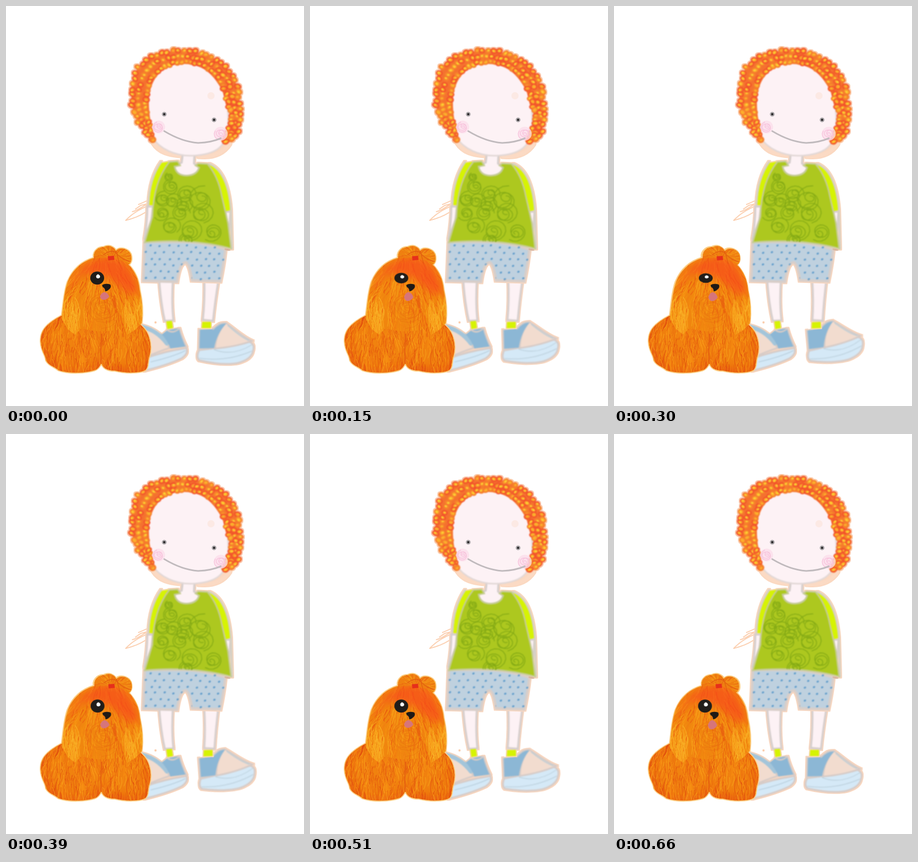
An HTML page that plays this animation: 580x780 px, repeating every 0.69 s.

```html
<!DOCTYPE html>
<html lang="en">
<head>
<meta charset="utf-8">
<title>Boy and dog</title>
<style>
  html, body { margin: 0; width: 100%; height: 100%; overflow: hidden; background: #fff; }
  svg { display: block; width: 580px; height: 780px; }
  .line { fill: none; stroke-linecap: round; stroke-linejoin: round; }
  .skin { fill: #fdf2f5; stroke: #d6cecc; stroke-width: 4; }
  .lime { fill: #d6f303; }
  .sole { fill: #d5e9f7; stroke: #d6cbc7; stroke-width: 3.5; }
  .denim { fill: #8cb7d5; }
  .toe { fill: #f2dccf; stroke: #d6cbc7; stroke-width: 3; }
  #leg, #shoe, #head, #eye, #tongue { animation: 690ms linear infinite; }
  #leg { transform-origin: 400px 540px; animation-name: leg; }
  #shoe { transform-origin: 390px 640px; animation-name: shoe; }
  #head { transform-origin: 186px 640px; animation-name: sway; }
  #eye { transform-origin: 178px 531px; animation-name: blink; }
  #tongue { transform-origin: 191px 558px; animation-name: pant; }
  @keyframes leg {
    0%, 13% { transform: rotate(0deg); }
    30.4% { transform: rotate(-2deg); }
    43.5% { transform: rotate(-2.4deg); }
    65.2% { transform: rotate(-2deg); }
    73.9% { transform: rotate(-1.3deg); }
    95.7%, 100% { transform: rotate(0deg); }
  }
  @keyframes shoe {
    0% { transform: rotate(0deg); }
    13% { transform: rotate(-.6deg); }
    30.4% { transform: rotate(-5.2deg); }
    43.5% { transform: rotate(-6.4deg); }
    65.2% { transform: rotate(-5.2deg); }
    73.9% { transform: rotate(-3.8deg); }
    95.7%, 100% { transform: rotate(0deg); }
  }
  @keyframes sway {
    0%, 13% { transform: rotate(0deg); }
    30.4% { transform: rotate(.3deg); }
    43.5% { transform: rotate(.6deg); }
    65.2% { transform: rotate(.2deg); }
    95.7% { transform: rotate(-.2deg); }
    100% { transform: rotate(0deg); }
  }
  @keyframes blink {
    0%, 17.4% { transform: scaleY(1); }
    30.4% { transform: scaleY(.47); }
    34.8% { transform: scaleY(.44); }
    43.5% { transform: scaleY(.73); }
    56%, 100% { transform: scaleY(1); }
  }
  @keyframes pant {
    0% { transform: scaleY(1); }
    13% { transform: scaleY(1.26); }
    30.4% { transform: scaleY(1.03); }
    43.5% { transform: scaleY(1.16); }
    65.2%, 73.9% { transform: scaleY(1); }
    95.7% { transform: scaleY(1.2); }
    100% { transform: scaleY(1); }
  }
</style>
</head>
<body>
<svg viewBox="0 0 580 780" width="580" height="780">
  <defs>
    <filter id="soft" filterUnits="userSpaceOnUse" x="0" y="0" width="580" height="780" color-interpolation-filters="sRGB">
      <feMorphology in="SourceAlpha" operator="dilate" radius="2"/>
      <feGaussianBlur stdDeviation=".6" result="edge"/>
      <feFlood flood-color="#fbd8c0"/>
      <feComposite in2="edge" operator="in" result="halo"/>
      <feGaussianBlur in="SourceGraphic" stdDeviation=".9" result="art"/>
      <feMerge><feMergeNode in="halo"/><feMergeNode in="art"/></feMerge>
    </filter>
    <filter id="blur"><feGaussianBlur stdDeviation=".7"/></filter>
    <filter id="mist" x="-40%" y="-40%" width="180%" height="180%"><feGaussianBlur stdDeviation="7"/></filter>
    <path id="bodyShape" d="M108 604 C82 618 65 632 68 658 C70 675 77 680 78 691 C84 702 93 702 102 710 C122 717 154 716 173 710 C181 707 182 701 186 697 C189 706 198 711 212 711 C232 716 261 716 271 710 C278 704 275 693 279 683 C285 662 279 636 264 624 L248 604 Z"/>
    <path id="headShape" d="M172 491 C147 498 130 514 120 538 C112 562 112 585 108 609 L120 630 L134 641 L148 628 C170 637 210 636 228 627 L236 641 L251 632 L264 618 C267 594 264 571 260 553 C258 531 250 517 240 506 Q225 489 172 491 Z"/>
    <path id="knotShape" d="M172 494 C167 481 177 470 190 470 C201 464 211 471 214 477 C222 469 238 473 243 484 C247 498 241 508 229 506 C220 506 213 497 207 493 C196 501 180 500 172 494 Z"/>
    <path id="shirtShape" d="M318 304 L334 303 L339 311 L328 313 Q331 331 352 331 Q372 330 376 315 L369 311 L374 307 L392 308 Q413 332 420 371 L432 424 L438 473 Q400 462 350 459 Q305 457 270 461 L285 411 Q287 342 318 304 Z"/>
    <path id="shortsShape" d="M270 460 L267 536 L333 538 Q338 500 350 500 Q357 503 362 535 L417 537 Q424 503 427 475 Q390 462 350 460 Z"/>
    <clipPath id="bodyClip"><use href="#bodyShape"/></clipPath>
    <clipPath id="headClip"><use href="#headShape"/></clipPath>
    <clipPath id="knotClip"><use href="#knotShape"/></clipPath>
    <clipPath id="shirtClip"><use href="#shirtShape"/></clipPath>
    <clipPath id="shortsClip"><use href="#shortsShape"/></clipPath>
  </defs>

  <!-- scribble behind the back -->
  <g class="line" stroke="#fbcfb0" stroke-width="2" stroke-dasharray="2 1">
    <path d="M273 391 Q248 402 233 418 Q254 413 272 402 M246 401 Q255 399 271 388 M252 396 L262 389 L273 386 M258 387 L274 380"/>
  </g>
  <circle cx="291" cy="617" r="2.2" fill="#fbcfb0"/>

  <g id="shoe" filter="url(#soft)">
    <path class="sole" d="M376 671 Q420 666 474 655 Q485 660 481 672 Q478 689 452 696 Q425 702 376 691 Q369 684 376 671 Z"/>
    <path class="toe" d="M428 618 C442 627 460 645 479 653 Q450 664 407 668 Q409 638 428 618 Z"/>
    <path class="line" d="M432 623 C442 632 456 645 472 652" stroke="#bccdd6" stroke-width="2"/>
    <path class="denim" d="M376 631 L400 630 L416 618 L430 618 Q411 636 405 667 L376 668 Z"/>
    <path class="line" d="M376 631 L375 671 M403 630 Q416 616 428 618" stroke="#d6cbc7" stroke-width="3"/>
    <path class="line" d="M377 687 Q430 694 478 673 M405 670 Q440 684 478 661" stroke="#bcd0dc" stroke-width="1.4"/>
  </g>
  <g id="leg" filter="url(#soft)">
    <path class="skin" d="M386 532 L414 532 Q407 575 403 614 L383 612 Q387 578 386 532 Z"/>
    <path class="lime" d="M382 616 L399 616 L399 628 L381 628 Z"/>
  </g>

  <g filter="url(#soft)">
    <path class="skin" d="M298 532 L325 532 Q322 580 326 613 L309 614 Q301 578 298 532 Z"/>
    <path class="lime" d="M312 615 L323 614 L325 628 L314 630 Z"/>
    <path class="sole" d="M351 667 Q356 677 342 687 Q315 700 270 711 L268 688 Q305 674 351 667 Z"/>
    <path class="toe" d="M262 622 C289 629 307 642 318 667 Q295 674 270 686 Z"/>
    <path class="line" d="M263 625 Q294 632 313 658" stroke="#a3c5da" stroke-width="8"/>
    <path class="denim" d="M304 640 L314 632 L337 628 Q343 645 351 664 L320 668 Q314 650 300 638 Z"/>
    <path class="line" d="M338 629 Q343 648 352 666 M314 632 Q325 640 337 629" stroke="#d6cbc7" stroke-width="3"/>
    <path class="line" d="M282 694 Q325 684 349 672" stroke="#b9cfdd" stroke-width="1.5"/>

    <use href="#shortsShape" fill="#bfd1df" stroke="#d8cec9" stroke-width="5"/>
    <g id="dots" fill="#5c9aca" clip-path="url(#shortsClip)"></g>

    <path class="skin" d="M275 391 L286 391 L283 417 L269 456 Q275 422 275 391 Z"/>
    <path class="skin" d="M427 401 L437 401 L434 440 Z"/>
    <path class="lime" d="M302 306 L320 303 Q294 344 288 389 L279 388 Q280 335 302 306 Z"/>
    <path class="lime" d="M390 308 Q430 318 437 398 L428 400 Q418 348 390 308 Z"/>
    <path class="line" d="M302 304 Q279 336 277 388 M396 308 Q432 323 438 398 L440 473" stroke="#d6d0c2" stroke-width="4"/>
    <path class="skin" d="M344 288 L342 305 L328 313 Q331 331 352 331 Q372 330 376 315 L366 307 L367 288 Z"/>
    <use href="#shirtShape" fill="#adc81f" stroke="#c5cc92" stroke-width="3"/>
    <g clip-path="url(#shirtClip)"><path id="swirls" class="line" stroke="#85ab15" stroke-width="1.7"/></g>

    <path class="line" d="M287 266 C300 286 320 289 337 291 M376 293 C406 296 425 284 435 268" stroke="#fbdac4" stroke-width="7"/>
    <path d="M284 255 C262 200 270 110 345 105 C420 105 440 190 430 250 C424 282 395 291 360 292 C330 292 300 280 284 255 Z" fill="#fdf2f5" stroke="#e2d8d6" stroke-width="3"/>
    <path fill="#f4712f" d="M284 260 C264 238 243 215 244 172 C244 118 272 88 340 87 C403 88 448 120 453 175 C460 220 455 260 428 264 C427 245 438 228 434 205 C424 190 427 175 418 160 C402 132 382 113 345 113 C325 113 305 120 290 142 C270 175 280 215 287 260 Z"/>
    <g id="curls" stroke-width="2.4"></g>
  </g>

  <g filter="url(#blur)">
    <circle cx="399" cy="175" r="7" fill="#fbdccb" opacity=".4"/>
    <g fill="#fbdcea" opacity=".75"><circle cx="297" cy="236" r="12.5"/><circle cx="418" cy="249" r="13.5"/></g>
    <path id="blush" class="line" stroke="#f8c6de" stroke-width="1.5"/>
    <path class="line" d="M308 244 Q343 265 374 267 Q400 266 418 258" stroke="#c0babd" stroke-width="3.2"/>
    <g fill="#2b292b" stroke="#a9a5a8" stroke-width="2.4"><circle cx="308" cy="211" r="3.4"/><circle cx="405" cy="222" r="3.4"/></g>
    <ellipse cx="431" cy="475" rx="6" ry="2" fill="#d8b6a0" transform="rotate(12 431 475)"/>
  </g>

  <g id="dog">
    <g fill="none" stroke="#fbcf86" stroke-width="4">
      <use href="#knotShape"/><use href="#headShape"/><use href="#bodyShape"/>
    </g>
    <use href="#bodyShape" fill="#f0820f"/>
    <g clip-path="url(#bodyClip)">
      <use href="#bodyShape" fill="none" stroke="#e2400f" stroke-width="18" opacity=".6" filter="url(#mist)"/>
      <g id="bodyFur"></g>
      <path class="line" d="M186 640 Q183 670 186 705" stroke="#e45e10" stroke-width="2"/>
    </g>
    <g id="head">
      <g clip-path="url(#knotClip)">
        <use href="#knotShape" fill="#ee8210"/>
        <g id="knotFur"></g>
      </g>
      <use href="#headShape" fill="#f0860f"/>
      <g clip-path="url(#headClip)">
        <g id="headFur"></g>
        <path d="M118 556 Q145 490 205 490 Q248 496 258 560 Q240 566 222 548 Q200 520 150 522 Z" fill="#f8461c" opacity=".65" filter="url(#mist)"/>
        <path id="muzzle" class="line" stroke="#e5680f" stroke-width="1" opacity=".5"/>
      </g>
      <path class="line" d="M190 485 Q202 475 213 480 Q222 492 239 498 M214 478 L221 502" stroke="#e2580f" stroke-width="1.6" opacity=".8"/>
      <path d="M198 488 L210 487 L211 495 L199 496 Z" fill="#e62f1b"/>
      <path id="tongue" d="M183 566 Q186 558 192 558 Q199 560 201 567 Q196 573 190 573 Q184 573 183 566 Z" fill="#d6757b"/>
      <path d="M187 544 Q194 540 203 543 Q206 549 200 553 Q197 557 193 556 Q193 550 188 548 Z" fill="#1e1a17"/>
      <g id="eye">
        <ellipse cx="177.5" cy="530.5" rx="13.5" ry="12.7" fill="#211d1a"/>
        <path d="M179 523 Q184 525 183 529 Q180 533 176 530 Q174 525 179 523 Z" fill="#fff"/>
      </g>
    </g>
  </g>
</svg>
<script>
  const $ = id => document.getElementById(id);
  const add = (parent, tag, attrs) => {
    const el = document.createElementNS('http://www.w3.org/2000/svg', tag);
    for (const k in attrs) el.setAttribute(k, attrs[k]);
    parent.appendChild(el);
    return el;
  };
  let seed = 7;
  const rnd = (a = 0, b = 1) => {
    seed = (seed * 16807) % 2147483647;
    return a + (b - a) * seed / 2147483647;
  };
  // loose hand-drawn rings that wind outwards
  const spiral = (x, y, r, turns = 3) => {
    let d = '';
    const n = turns * 14, phase = rnd(0, 6);
    for (let i = 0; i <= n; i++) {
      const a = phase + i / 14 * Math.PI * 2;
      const k = r * (.22 + .78 * i / n), drift = r * .14 * Math.sin(a * .37 + phase);
      d += `${i ? 'L' : 'M'}${(x + drift + k * Math.cos(a)).toFixed(1)} ${(y - drift + k * .9 * Math.sin(a)).toFixed(1)}`;
    }
    return d;
  };

  // hair: rows of curls between two guide curves
  const guide = d => add(document.querySelector('defs'), 'path', { d });
  const rimOut = guide('M284 260 C262 238 240 215 241 172 C241 116 270 85 340 84 C405 84 451 118 456 175 C463 220 457 260 428 264');
  const rimIn = guide('M286 258 C280 215 270 175 290 142 C305 120 325 113 345 113 C382 113 402 132 418 160 C427 175 424 190 434 205 C438 228 427 245 426 262');
  const at = (p, t) => p.getPointAtLength(p.getTotalLength() * t);
  for (let i = 0; i <= 46; i++) {
    for (const k of [.16, .54, .9]) {
      const t = Math.min(1, (i + (k === .54 ? .5 : 0)) / 46);
      const a = at(rimIn, t), b = at(rimOut, t);
      const x = a.x + (b.x - a.x) * k + rnd(-2, 2), y = a.y + (b.y - a.y) * k + rnd(-2, 2);
      const curl = add($('curls'), 'g', { transform: `translate(${x} ${y}) rotate(${rnd(-40, 40)})` });
      add(curl, 'ellipse', {
        rx: rnd(4.8, 6.4), ry: rnd(3.8, 5),
        fill: rnd() < .5 ? '#fba62c' : '#f88a2b',
        stroke: rnd() < .6 ? '#f2512b' : '#f57c2c'
      });
      add(curl, 'ellipse', { cx: rnd(-1.5, 1.5), cy: rnd(-1, 1), rx: 2.6, ry: 1.8, fill: rnd() < .7 ? '#fcd634' : '#fbb42c' });
    }
  }

  $('swirls').setAttribute('d', [
    [318, 333, 9], [322, 352, 16], [350, 367, 18], [306, 377, 16], [324, 381, 16],
    [345, 388, 17], [379, 377, 26], [304, 405, 14], [320, 430, 18], [340, 403, 17],
    [380, 405, 22], [358, 439, 22], [402, 442, 18], [352, 456, 15]
  ].map(s => spiral(...s)).join(''));
  $('blush').setAttribute('d', spiral(297, 236, 11) + spiral(418, 249, 12));
  $('muzzle').setAttribute('d', spiral(188, 586, 30, 5) + spiral(192, 592, 36, 4));

  for (let r = 0; r < 6; r++)
    for (let c = 0; c < 10; c++) {
      const x = 265 + c * 17.6 + (r % 2) * 8 + rnd(-1.5, 1.5), y = 468 + r * 12.3 + rnd(-1.5, 1.5) + (c > 5 ? 2 : 0);
      add($('dots'), 'ellipse', { cx: x, cy: y, rx: 2.4, ry: 1.8, transform: `rotate(-25 ${x} ${y})` });
    }

  // fur: random strokes following a direction field, one path per colour
  const fur = (id, count, [x0, y0, x1, y1], len, dir, colours) => colours.forEach(stroke => {
    let d = '';
    for (let i = 0; i < count; i++) {
      const x = rnd(x0, x1), y = rnd(y0, y1), a = dir(x, y) + rnd(-.25, .25);
      const l = rnd(.5, 1) * len, bend = rnd(-.25, .25);
      const c = Math.cos(a) * l, s = Math.sin(a) * l;
      d += `M${(x - c / 2).toFixed(1)} ${(y - s / 2).toFixed(1)}q${(c / 2 - s * bend).toFixed(1)} ${(s / 2 + c * bend).toFixed(1)} ${c.toFixed(1)} ${s.toFixed(1)}`;
    }
    add($(id), 'path', { d, stroke, class: 'line', 'stroke-width': 1.2, opacity: .75 });
  });
  const down = Math.PI / 2;
  fur('bodyFur', 140, [66, 600, 284, 718], 34,
    (x, y) => down + ((x < 186 ? 130 : 232) - x) * .006 * (700 - y) / 70,
    ['#df480f', '#f8a51c', '#f1780f', '#f88f12', '#e9640e']);
  fur('headFur', 110, [105, 488, 268, 645], 36,
    (x, y) => Math.atan2(y - 455, (x - 190) * (y < 580 ? .9 : .25)),
    ['#e8540f', '#f9a91d', '#f27a12', '#f7900f']);
  for (const x of [108, 232])
    fur('headFur', 34, [x, 580, x + 34, 640], 36, () => down, ['#fbbd2d', '#f9a51c']);
  fur('knotFur', 45, [168, 465, 246, 508], 18, (x, y) => Math.atan2(y - 492, x - 205),
    ['#e85c12', '#f8a51c', '#f27b12']);
</script>
</body>
</html>
```
